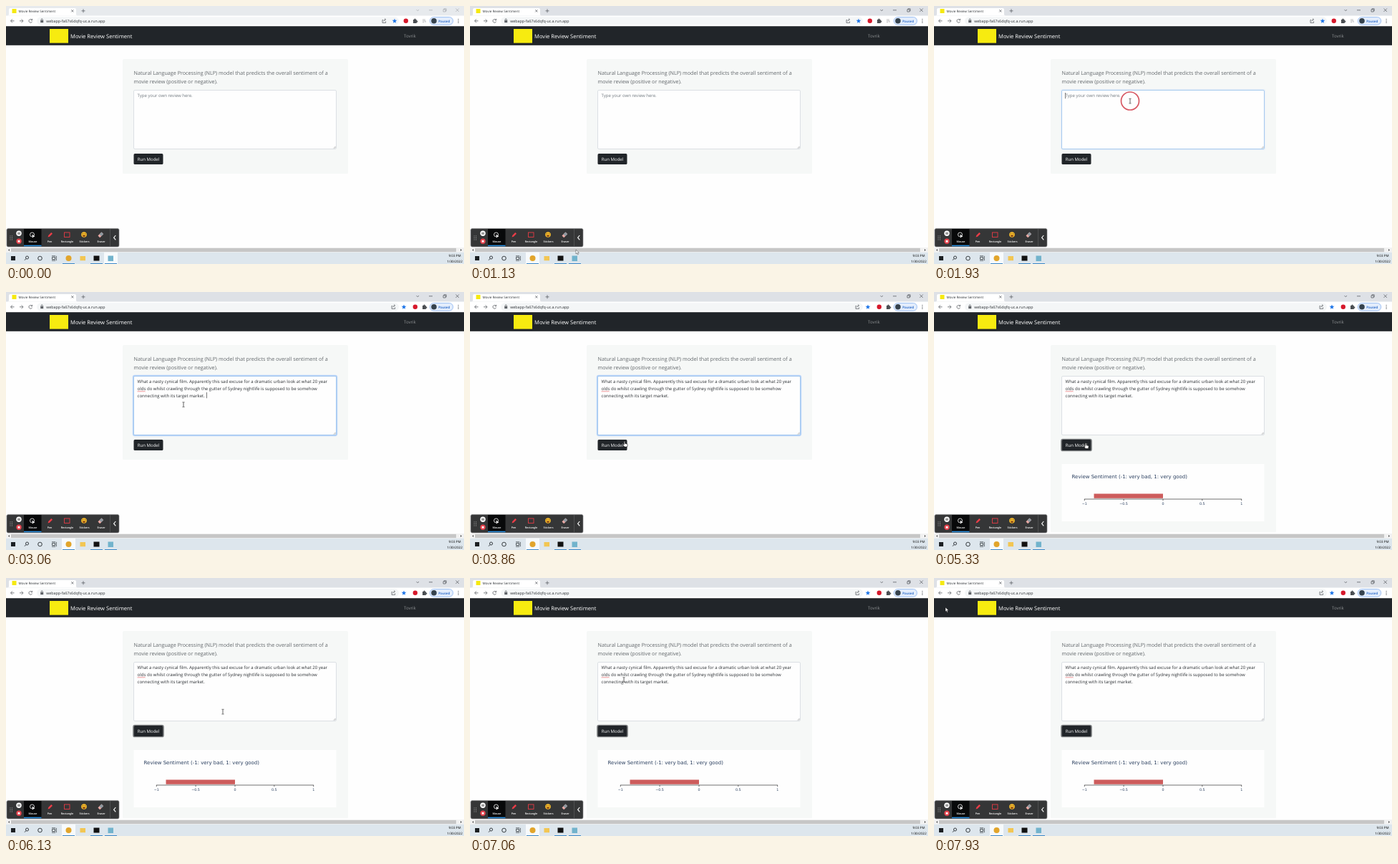
Write an HTML page that moves like this. It is 640x360 px and loops after 8 s.

```html
<!DOCTYPE html>
<html lang="en">
<head>
<meta charset="utf-8">
<title>Movie Review Sentiment</title>
<style>
  html, body { margin: 0; width: 100%; height: 100%; overflow: hidden; background: #fefefe; }
  svg { display: block; width: 640px; height: 360px; }
  text { font: 6.06px "Open Sans", sans-serif; text-rendering: geometricPrecision; fill: #2b2f33; white-space: pre; }
  .small { font-size: 4.55px; }
  .lead { font-size: 7.2px; fill: #62676b; }
  .mid { text-anchor: middle; }
  .tool text { font-size: 3.7px; font-weight: 600; fill: #fff; text-anchor: middle; }
  .plot text { font: 4.8px "DejaVu Sans", sans-serif; fill: #2a3f5f; }
  .plot .title { font-size: 6.97px; }
  .line { fill: none; stroke: #5f6368; stroke-width: .8; }
</style>
</head>
<body>
<svg viewBox="0 0 640 360">
  <!-- browser frame -->
  <rect id="strip" width="640" height="14"/>
  <path d="M2 13.5q2 0 2-2V5q0-2 2-2h90q2 0 2 2v6.500q0 2 2 2z" fill="#fff"/>
  <rect x="8.5" y="4" width="6" height="6" fill="#f5e911"/>
  <text id="tab" class="small" x="17.5" y="8.6"></text>
  <path class="line" d="M91.2 5.2l3.2 3.2m0-3.2l-3.2 3.2M105.5 6.8h5m-2.5-2.5v5"/>
  <path id="controls" class="line" d="M573.5 5l1.8 1.8L577 5M591 5.8h5M611 4.8h3.2V8H611zM612 4.800V3.800h3.200V7h-1M628.5 3.5l4.4 4.4m0-4.4l-4.4 4.4"/>
  <rect y="13.5" width="640" height="15" fill="#fff"/>
  <rect x="43" y="15.3" width="506" height="11" rx="5.5" fill="#f4f6f7"/>
  <path class="line" d="M11.5 20.8H6.5m2.5-2.4l-2.5 2.4 2.5 2.4M19 20.8h5m-2.4-2.4l2.4 2.4-2.4 2.4M36.4 19.6a2.4 2.4 0 1 0 .2 2M36.6 17.8v2h-2"/>
  <path d="M48.2 20h4v3.2h-4z" fill="#5f6368"/>
  <path class="line" d="M49.1 20v-1a1.1 1.1 0 0 1 2.2 0v1"/>
  <text x="56.2" y="22.8" style="font-size:5.32px">webapp-fa67s6dqfq-uc.a.run.app</text>
  <g id="actions">
    <path class="line" d="M527 19.4h-1v4h4.6v-2m-2.8 0q0-2.3 2.6-2.6m-1.2-1.2l1.4 1.2-1.4 1.3"/>
    <path d="M543 17.4l.9 2.3 2.5.1-2 1.6.7 2.4-2.1-1.4-2.1 1.4.7-2.4-2-1.6 2.5-.1z" fill="#1a73e8"/>
    <circle cx="558.8" cy="20.8" r="3.2" fill="#d6182b"/>
    <path d="M569 19h1.5a1.1 1.1 0 1 1 2 0h1.3v1.6a1.1 1.1 0 1 1 0 2v1.3H569z" fill="#4b4f53"/>
  </g>
  <path id="playlist" class="line" d="M582 19h4m-4 1.8h4m-4 1.8h2.4m1.8-2v2.4" opacity=".5"/>
  <rect x="592.3" y="15.5" width="32.4" height="10.7" rx="5.3" fill="#e3edfc" stroke="#7fadf0" stroke-width=".7"/>
  <circle cx="598" cy="20.8" r="3.8" fill="#35424d"/>
  <text class="small" x="604.3" y="22.6" style="fill:#1a5fc4;font-weight:600">Paused</text>
  <path d="M631.5 17.900h1.200v1.200h-1.200zm0 2.300h1.200v1.200h-1.200zm0 2.300h1.200v1.200h-1.200z" fill="#5f6368"/>

  <!-- page -->
  <rect y="28.2" width="640" height="26.6" fill="#212529"/>
  <rect x="61" y="32" width="26" height="19.6" fill="#f7eb10"/>
  <text x="90" y="44.8" style="font-size:7.63px;fill:#fff">Movie Review Sentiment</text>
  <text x="556" y="44.1" style="fill:#8f9294">Tovrik</text>
  <rect id="card" x="163" y="74" width="315" rx="1.6" fill="#f6f8f7"/>
  <text class="lead" x="178.5" y="95.6">Natural Language Processing (NLP) model that predicts the overall sentiment of a</text>
  <text class="lead" x="178.5" y="107.6">movie review (positive or negative).</text>
  <rect id="glow" x="177.7" y="116.7" width="284.6" height="83.6" rx="2.2" fill="none" stroke="#0d6efd" stroke-opacity=".27" stroke-width="1.8"/>
  <rect id="field" x="178.5" y="117.5" width="283" height="82" rx="1.6" fill="#fefefe" stroke-width=".7"/>
  <path class="line" d="M457.8 198.6l2.8-2.8m-1.2 2.8l1.2-1.2" stroke-opacity=".6"/>
  <text id="hint" x="183.6" y="127.3" style="fill:#70787f">Type your own review here.</text>
  <g id="review">
    <text x="183.6" y="127.3">What a nasty cynical film. Apparently this sad excuse for a dramatic urban look at what 20 year</text>
    <text x="183.6" y="136.9">olds do whilst crawling through the gutter of Sydney nightlife is supposed to be somehow</text>
    <text x="183.6" y="146.5">connecting with its target market.</text>
    <path d="M183.6 138.4l1 .6 1-.6 1 .6 1-.6 1 .6 1-.6 1 .6 1-.6 1 .6 1-.6 1 .6" fill="none" stroke="#e0393e" stroke-width=".6"/>
  </g>
  <rect id="caret" width=".6" height="8.2" fill="#222"/>
  <rect id="ring" x="177.9" y="205.5" width="42.2" height="16.1" rx="2.2" fill="none" stroke="#424649" stroke-opacity=".65" stroke-width="1.5"/>
  <rect x="178.5" y="206.1" width="41" height="14.9" rx="1.6" fill="#212529"/>
  <text x="183.8" y="215.9" style="fill:#fff">Run Model</text>
  <g id="plot" class="plot">
    <rect x="178.5" y="240" width="283" height="80" fill="#fefefe"/>
    <text class="title" x="192.6" y="260.4">Review Sentiment (-1: very bad, 1: very good)</text>
    <rect x="223.5" y="281.5" width="96.5" height="6.3" fill="#cd5c5c"/>
    <path d="M210 289h220M210.3 289v2.2m54.8-2.2v2.2m54.9-2.2v2.2m54.8-2.2v2.2m54.9-2.2v2.2" stroke="#333" stroke-width=".7"/>
    <g class="mid">
      <text x="210.3" y="296.8">−1</text><text x="265.1" y="296.8">−0.5</text><text x="320" y="296.8">0</text>
      <text x="374.8" y="296.8">0.5</text><text x="429.7" y="296.8">1</text>
    </g>
  </g>
  <rect y="337.2" width="640" height="6.6" fill="#f1f1f1"/>
  <rect x="7" y="337.9" width="622" height="5.2" fill="#c6c6c6"/>
  <path d="M5 339v3l-2-1.5zM635 339v3l2-1.5z" fill="#555"/>

  <!-- recorder bar -->
  <g class="tool">
    <rect x="1" y="310.6" width="157" height="25.4" rx="2" fill="#353637" stroke="#8b8c8d" stroke-width=".6"/>
    <rect x="25" y="311" width="24.5" height="24" fill="#08090a"/>
    <rect x="25" y="333.7" width="24.5" height="1.5" fill="#2b95e8"/>
    <path d="M6 320.5v6.5m2.5-6.5v6.5" stroke="#aaa" stroke-dasharray="1 1.5"/>
    <circle cx="18" cy="317.3" r="3.7" fill="#fff"/>
    <path d="M17 315.7v3.2m2-3.2v3.2" stroke="#222" stroke-width=".9"/>
    <circle cx="18" cy="328.3" r="3.7" fill="#e4414c"/>
    <rect x="16.6" y="326.9" width="2.8" height="2.8" fill="#fff"/>
    <circle cx="36.5" cy="319" r="3" fill="none" stroke="#fff" stroke-width=".8"/>
    <path d="M36.3 318.5l4.2 3.2-2 .2-1.2 1.8z" fill="#fff"/>
    <path d="M58.5 322.5l.8-2.5 4-4 1.7 1.7-4 4z" fill="#ee3d48"/>
    <rect x="81.5" y="316" width="7.5" height="6.5" fill="none" stroke="#e63b45" stroke-width=".9"/>
    <circle cx="109" cy="319" r="3.8" fill="#f9bd2b"/>
    <path d="M107.5 317.2v1.2m3-1.2v1.2" stroke="#503414" stroke-width=".9"/>
    <path d="M106.8 319.8h4.4q-.4 2.2-2.2 2.2t-2.2-2.2" fill="#7d3b15"/>
    <path d="M128.5 320.5l5-5 2.7 2.7-5 5z" fill="#eba9a4"/>
    <path d="M130.5 318.5l3-3 2.7 2.7-3 3z" fill="#8d98a0"/>
    <path d="M145.5 311v24.5" stroke="#5a5b5c" stroke-width=".7"/>
    <path d="M153.3 320l-2.7 3.2 2.7 3.2" fill="none" stroke="#fff" stroke-width="1.1"/>
    <text x="37.5" y="329.9">Mouse</text><text x="61" y="329.9">Pen</text><text x="85.5" y="329.9">Rectangle</text>
    <text x="109.5" y="329.9">Stickers</text><text x="133" y="329.9">Eraser</text>
  </g>

  <!-- taskbar -->
  <rect y="343.8" width="640" height="16.2" fill="#dde6ed"/>
  <rect id="active" y="343.8" width="19" height="16.2" fill="#f7fafc"/>
  <path d="M79 359.5h17m22 0h17m3 0h17" stroke="#3c87c7"/>
  <rect x="7" y="349" width="6" height="6" fill="#1b1f23"/>
  <g fill="none" stroke="#22272b" stroke-width=".9">
    <circle cx="29.5" cy="351" r="2"/><path d="M28 352.5l-2 2.2"/>
    <circle cx="47.5" cy="352" r="2.8"/>
    <path d="M64.5 350.5h4v3h-4zM64 348.8h5m-5 6.4h5m1.3-6.4v6.4" stroke-width=".7"/>
  </g>
  <circle cx="87.5" cy="352" r="4" fill="#e2a52b"/>
  <rect x="103.5" y="349" width="7.5" height="6.2" fill="#f2c653"/>
  <rect x="122.5" y="348.5" width="8" height="7" fill="#111"/>
  <rect x="142.5" y="348.5" width="7.5" height="7.5" fill="#72b3cc"/>
  <g class="mid">
    <text class="small" x="627" y="349.8" style="fill:#000">9:03 PM</text>
    <text class="small" x="627" y="357.5" style="fill:#000">1/30/2022</text>
  </g>

  <!-- pointer: origin is the hot spot -->
  <g id="pointer">
    <circle id="click" r="12.5" fill="#fff" fill-opacity=".4" stroke="#d75762" stroke-width="1.7"/>
    <path id="beam" d="M-1.5-3.2h1l.5.4.5-.4h1M0-2.8v5.8M-1.5 3.4h1l.5-.4.5.4h1" fill="none" stroke="#222" stroke-width=".7"/>
    <path id="hand" d="M-.8.2q.8-.9 1.5 0v2.7l2.6.5q1 .3.9 1.3l-.5 2.9H-.2l-2.1-2.9q0-1 1.5-.1z" fill="#fff" stroke="#111" stroke-width=".6"/>
    <path id="arrow" d="M0 0v6l1.4-1.3 1 2.2 1-.4-1-2.2h2z" fill="#fff" stroke="#111" stroke-width=".4"/>
  </g>
</svg>
<script>
const LOOP = 8000;
const WAKE = 330, FOCUS = 1860, PASTE = 2820, RUN = 4580, RESULT = 5080;
const path = [ // time, x, y
  [1130, 148, 340], [1720, 274, 132.5], [2350, 274, 132.5], [2900, 248, 157], [3430, 248, 157],
  [3850, 216, 208.5], [4350, 211.5, 211], [5300, 211.5, 211], [6050, 303, 186.5],
  [6660, 303, 186.5], [7750, 16, 41]
];
const el = id => document.getElementById(id);
const show = (id, on) => el(id).style.display = on ? "" : "none";
const set = (id, attrs) => { for (const k in attrs) el(id).setAttribute(k, attrs[k]); };
const within = (x, y, l, t, r, b) => x >= l && x <= r && y >= t && y <= b;

function pointerAt(t) {
  const i = path.findIndex(p => p[0] > t);
  if (i < 0) return path[path.length - 1].slice(1);
  if (i === 0) return path[0].slice(1);
  const [t0, x0, y0] = path[i - 1], [t1, x1, y1] = path[i];
  const u = (t - t0) / (t1 - t0), k = u * u * (3 - 2 * u);
  return [x0 + (x1 - x0) * k, y0 + (y1 - y0) * k];
}

function draw(t) {
  const awake = t >= WAKE, pasted = t >= PASTE, done = t >= RESULT;
  const focused = t >= FOCUS && t < RUN;
  el("tab").textContent = t >= RUN && !done ? "Updating..." : "Movie Review Sentiment";
  set("strip", { fill: awake ? "#dee1e6" : "#e7eaed" });
  set("controls", { opacity: awake ? 1 : .4 });
  set("active", { x: awake ? 78 : 137 });
  show("playlist", t < 2400);
  set("actions", { transform: `translate(${t < 2400 ? 0 : 13})` });

  set("card", { height: done ? 261 : 160 });
  show("plot", done);
  show("hint", !pasted);
  show("review", pasted);
  set("field", { stroke: focused ? "#86b7e8" : "#ced4da" });
  el("glow").style.opacity = focused ? Math.min(1, (t - FOCUS) / 150) ** 2 : 0;
  show("ring", t >= RUN);
  show("caret", focused && (t - (pasted ? PASTE : FOCUS)) % 1060 < 530);
  set("caret", pasted ? { x: 280.3, y: 140 } : { x: 183.3, y: 121 });

  const [x, y] = pointerAt(t);
  const onField = within(x, y, 178, 117, 462, 200), onButton = within(x, y, 178, 206, 220, 221);
  show("pointer", t >= path[0][0]);
  set("pointer", { transform: `translate(${x} ${y})` });
  show("beam", onField);
  show("hand", onButton);
  show("arrow", !onField && !onButton);
  show("click", [FOCUS, RUN - 40].some(c => t >= c && t < c + 180));
}

(function tick() {
  draw(performance.now() % LOOP);
  requestAnimationFrame(tick);
})();
</script>
</body>
</html>
```
